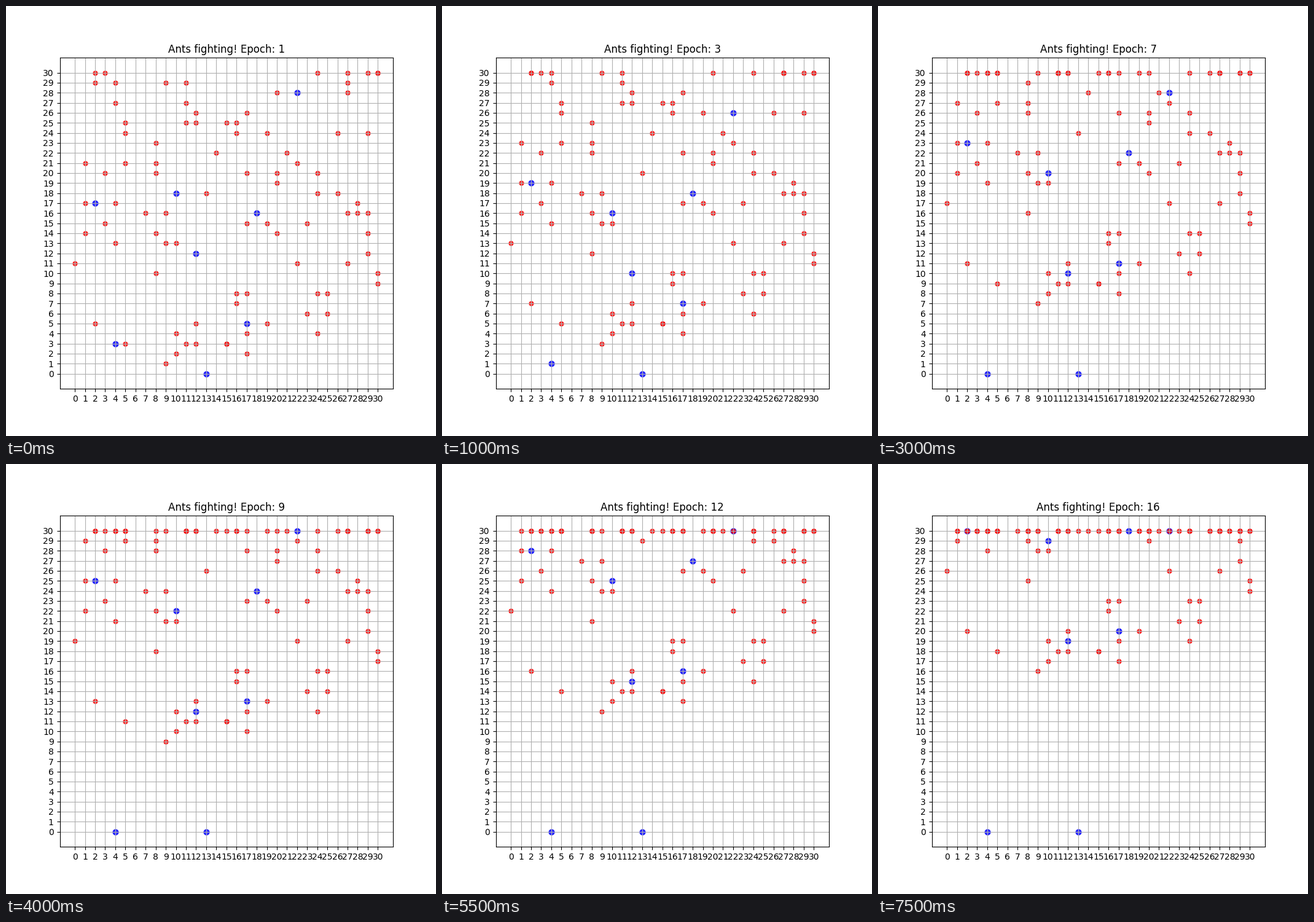
These frames come from a looping animation (700x700 px, 8 s). A matplotlib script:

```python
import matplotlib.pyplot as plt
import numpy as np
from matplotlib.animation import FuncAnimation

SIZE = 30
EPOCHS = 16

# Starting columns of the red ants, keyed by row
RED_ROWS = {
    30: (2, 3, 24, 27, 29, 30, 30), 29: (2, 4, 9, 11, 27), 28: (20, 27),
    27: (4, 11), 26: (12, 17), 25: (5, 11, 12, 15, 16),
    24: (5, 16, 19, 26, 29), 23: (8,), 22: (14, 21), 21: (1, 5, 8, 22),
    20: (3, 8, 17, 20, 24), 19: (20,), 18: (13, 24, 26), 17: (1, 4, 28),
    16: (7, 9, 27, 28, 29), 15: (3, 17, 19, 23), 14: (1, 8, 20, 29),
    13: (4, 9, 10), 12: (29,), 11: (0, 22, 27), 10: (8, 30), 9: (30,),
    8: (16, 17, 24, 25), 7: (16,), 6: (23, 25), 5: (2, 12, 19),
    4: (10, 17, 24), 3: (5, 11, 12, 15, 15), 2: (10, 17), 1: (9,),
}
reds = np.array([(x, y) for y, xs in RED_ROWS.items() for x in xs])

# Blue ants: column, row, number of downward steps before turning back up
blues = np.array([
    (22, 28, 3), (10, 18, 2), (2, 17, 0), (18, 16, 0),
    (12, 12, 4), (17, 5, 0), (4, 3, EPOCHS), (13, 0, EPOCHS),
])


def red_positions(step):
    x, y = reds.T
    return np.column_stack([x, np.minimum(y + step, SIZE)])


def blue_positions(step):
    x, y, turn = blues.T
    down = np.minimum(step, turn)
    return np.column_stack([x, np.clip(y + step - 2 * down, 0, SIZE)])


fig, ax = plt.subplots(figsize=(7, 7), dpi=100)
ax.set(xlim=(-1.5, SIZE + 1.5), ylim=(-1.5, SIZE + 1.5),
       xticks=range(SIZE + 1), yticks=range(SIZE + 1))
ax.grid(True)
title = ax.set_title("")
blue_dots = ax.scatter([], [], s=40, c="blue", alpha=0.8)
red_dots = ax.scatter([], [], s=25, c="red", alpha=0.8)


def update(step):
    title.set_text(f"Ants fighting! Epoch: {step + 1}")
    blue_dots.set_offsets(blue_positions(step))
    red_dots.set_offsets(red_positions(step))
    return title, blue_dots, red_dots


anim = FuncAnimation(fig, update, frames=EPOCHS, interval=500,
                     repeat=True, repeat_delay=0)
plt.show()
```
